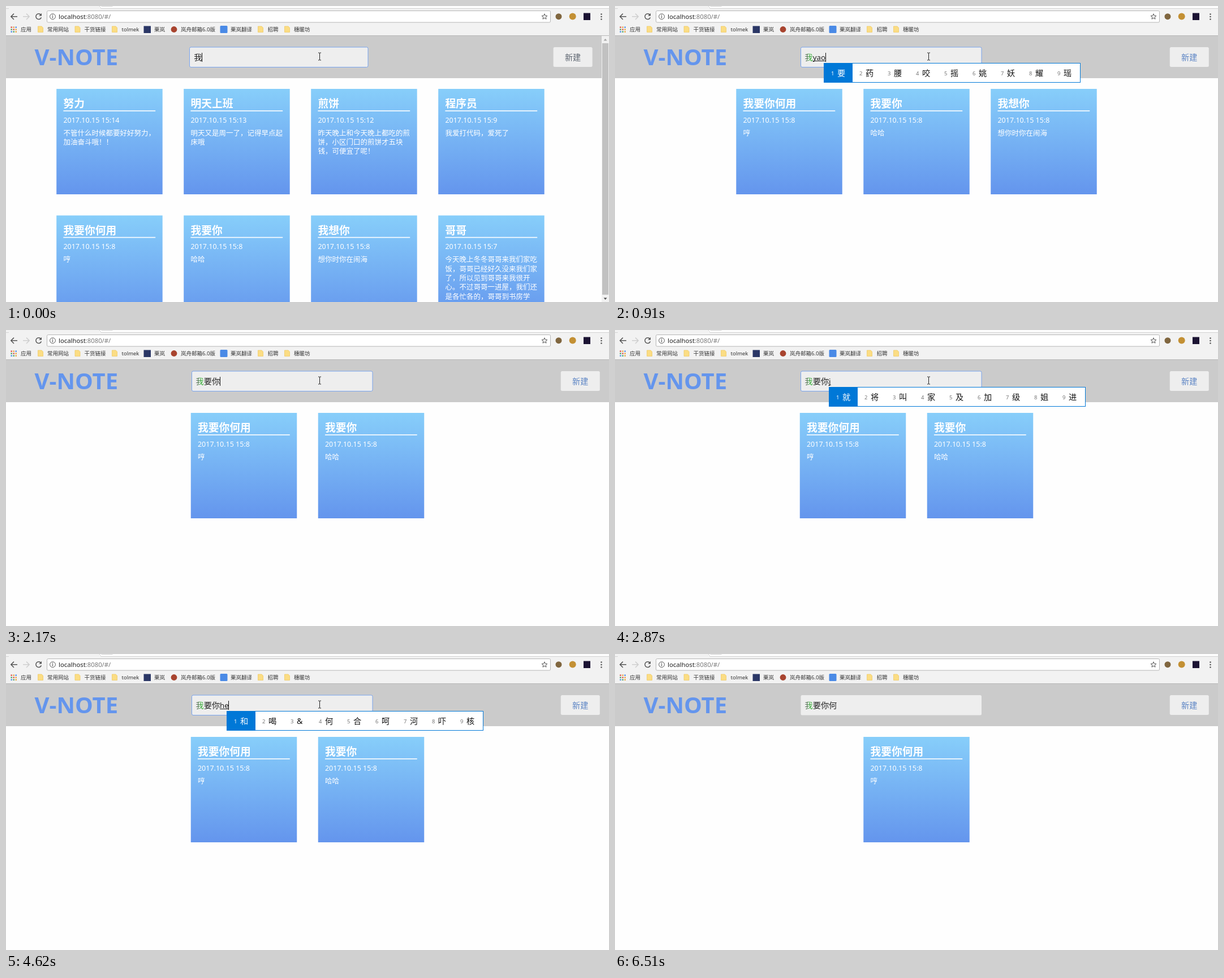
An HTML page for the animation above (6650 ms loop, 1066 by 525 pixels).

```html
<!DOCTYPE html>
<html lang="zh-CN">
<head>
<meta charset="utf-8">
<title>V-NOTE</title>
<style>
  html, body { margin: 0; width: 100%; height: 100%; overflow: hidden; background: #fefefe; }
  svg { display: block; font-family: "Noto Sans", "Noto Sans CJK SC", sans-serif; }
  text { white-space: pre; }
</style>
</head>
<body>
<svg id="stage" width="1066" height="525" viewBox="0 0 1066 525">
  <defs>
    <linearGradient id="sky" x2="0" y2="1">
      <stop stop-color="#87cefa"/><stop offset="1" stop-color="#6495ed"/>
    </linearGradient>
    <linearGradient id="tint">
      <stop offset=".2" stop-color="#5b6b5b"/><stop offset=".6" stop-color="#35ad35"/>
    </linearGradient>
  </defs>
  <g id="cards"></g>
  <g id="header">
    <rect y="53" width="1066" height="75" fill="#cbcbcb"/>
    <text x="50.5" y="105" font-size="40" font-weight="700" fill="#6495ed">V-NOTE</text>
    <rect id="field" y="73" height="35.5" rx="2.5" fill="#eee"/>
    <g id="button">
      <rect y="73" width="69" height="35" rx="2.5" fill="#eee"/>
      <text x="34.5" y="96.3" font-size="14.2" text-anchor="middle">新建</text>
    </g>
    <text id="first" y="96.3" font-size="14.2">我</text>
    <text id="rest" x="349.7" y="96.3" font-size="14.2" fill="#222"></text>
    <text id="comp" y="96" font-size="13.3" fill="#222"></text>
    <rect id="underline" y="97" height="1" fill="#222"/>
    <rect id="caret" y="83" width="1" height="16" fill="#111"/>
  </g>
  <g id="scrollbar">
    <rect x="1053" y="53" width="13" height="472" fill="#f1f1f1"/>
    <rect x="1054" y="66" width="11" height="446" fill="#c1c1c1"/>
    <path d="M1056.5 61.5l3-3.5 3 3.5z" fill="#a3a3a3"/>
    <path d="M1056.5 517.5l3 3.5 3-3.5z" fill="#505050"/>
  </g>
  <g id="ime"></g>
  <g id="chrome"></g>
  <path id="beam" d="M-2.5 -6.5h2l.5 .5 .5-.5h2M0 -6v12M-2.5 6.5h2l.5-.5 .5 .5h2" fill="none" stroke="#222"/>
  <path id="arrow" d="M0 0v15l3.6-3.4 2.4 5.4 2.2-1-2.4-5.2h4.8z" fill="#fff" stroke="#222" stroke-width=".9"/>
</svg>
<script>
const LOOP = 6650, TICK = 70;
const $ = id => document.getElementById(id);
const set = (el, attrs) => { for (const k in attrs) el.setAttribute(k, attrs[k]); };
const show = (el, on) => set(el, { visibility: on ? 'visible' : 'hidden' });
const text = (x, y, s, size, fill, more = '') =>
  `<text x="${x}" y="${y}" font-size="${size}" fill="${fill}" ${more}>${s}</text>`;
const rect = (x, y, w, h, fill, more = '') =>
  `<rect x="${x}" y="${y}" width="${w}" height="${h}" fill="${fill}" ${more}/>`;
const dot = (x, y, r, fill) => `<circle cx="${x}" cy="${y}" r="${r}" fill="${fill}"/>`;
const line = (d, stroke, w = 1.5) => `<path d="${d}" fill="none" stroke="${stroke}" stroke-width="${w}"/>`;

// Browser frame
function drawChrome() {
  const apps = ['#d9534a', '#e9a13b', '#4b8bea', '#4aa564', '#d9534a', '#e9a13b', '#4b8bea', '#4aa564', '#e9a13b'];
  const folder = x => `<path d="M${x} 36h6.5l2.5 2.5v8h-9z" fill="#fbdd84" stroke="#edc65c" stroke-width=".7"/>`;
  const marks = [[26, '应用'], [73, '常用网站'], [138.5, '干货链接'], [204.5, 'tolmek'], [262, '栗岚'],
    [309, '岚舟邮箱6.0版'], [397, '栗岚翻译'], [462.5, '招聘'], [509, '穗暖坊']];
  const star = Array.from({ length: 10 }, (_, i) => {
    const a = i * Math.PI / 5, r = i % 2 ? 2.3 : 5.2;
    return `${952 + r * Math.sin(a)},${19 - r * Math.cos(a)}`;
  }).join(' ');
  $('chrome').innerHTML =
    rect(0, 0, 1066, 53, '#f2f2f2') + rect(165, 0, 901, 4, '#fcfcfc') +
    line('M0 4.5h5M165 0l3 4.5h898', '#d2d2d2', 1) +
    rect(168, -3, 21, 4, '#d5d5d5', 'rx="1.5"') +
    rect(0, 52, 1066, 1, '#b9b9b9') +
    line('M20 18.8H9M14 13.6l-5.2 5.2 5.2 5.2', '#555') +
    line('M30 18.8h11M36 13.6l5.2 5.2-5.2 5.2', '#cfcfcf') +
    line('M61.6 15.6a4.9 4.9 0 1 0 .8 4.6', '#555') +
    '<path d="M63 12.8v4.8h-4.8z" fill="#555"/>' +
    rect(72.5, 8.5, 890, 20.5, '#fff', 'rx="2" stroke="#b5b5b5"') +
    '<circle cx="82.5" cy="18.7" r="4.9" fill="none" stroke="#555"/>' +
    line('M82.5 17.8v3.8M82.5 15.6v1.3', '#555', 1.2) +
    text(93, 22.7, 'localhost<tspan fill="#777">:8080/#/</tspan>', 11.3, '#222') +
    `<polygon points="${star}" fill="none" stroke="#555"/>` +
    dot(977, 18.7, 5.5, '#80663f') + dot(1001.7, 18.5, 6, '#c39034') +
    rect(1021, 12.5, 12, 12.5, '#1b1333') +
    [14.5, 19, 23.5].map(y => dot(1052.5, y, 1.3, '#555')).join('') +
    apps.map((c, i) => rect(8.5 + i % 3 * 4, 36.5 + (i / 3 | 0) * 4, 2.4, 2.4, c)).join('') +
    [56.5, 122, 187.5, 445.5, 492.5].map(folder).join('') +
    rect(243.5, 35.5, 12.5, 12.5, '#2b3766') + dot(297, 41.5, 5.4, '#a8442f') +
    rect(378.5, 35, 13, 13, '#4a8ae6', 'rx="1.5"') +
    marks.map(([x, s]) => text(x, 45.3, s, 9.5, '#333')).join('');
}

// Notes
const NOTES = [
  ['努力', '15:14', '不管什么时候都要好好努力，|加油奋斗哦！！'],
  ['明天上班', '15:13', '明天又是周一了，记得早点起|床哦'],
  ['煎饼', '15:12', '昨天晚上和今天晚上都吃的煎|饼，小区门口的煎饼才五块|钱，可便宜了呢！'],
  ['程序员', '15:9', '我爱打代码，爱死了'],
  ['我要你何用', '15:8', '哼'],
  ['我要你', '15:8', '哈哈'],
  ['我想你', '15:8', '想你时你在闹海'],
  ['哥哥', '15:7', '今天晚上冬冬哥哥来我们家吃|饭，哥哥已经好久没来我们家|了，所以见到哥哥来我很开|心。不过哥哥一进屋，我们还|是各忙各的，哥哥到书房学|习，我在客厅看书，大家都忙']
];
const STAGES = [[0, 1, 2, 3, 4, 5, 6, 7], [4, 5, 6], [4, 5], [4]];
// Moment each filter shows, and where its easing begins
const FILTERS = [[70, -88], [1330, 1265], [4970, 4910]];
const MOVE = 300, LEAVE_LAG = 0.135, EXIT = [458.25, 182.5];

function drawNotes() {
  $('cards').innerHTML = NOTES.map(([title, time, body]) => '<g>' +
    rect(0, 0, 187.5, 187, 'url(#sky)') +
    text(12.2, 33, title, 18.75, '#fff', 'font-weight="700"') +
    rect(12.2, 38.2, 162.8, 1.6, '#fff') +
    text(12.2, 59.6, '2017.10.15 ' + time, 12.5, '#fff') +
    body.split('|').map((s, i) => text(12.2, 82.8 + 16.3 * i, s, 12.5, '#fff')).join('') +
    '</g>').join('');
}

function slot(stage, note) {
  if (!stage) return [89.2 + 225 * (note % 4), 147 + 224.5 * (note >> 2)];
  const ids = STAGES[stage];
  return [551.75 - 112.5 * ids.length + 225 * ids.indexOf(note), 147];
}

// cubic-bezier(.25, .1, .25, 1)
function ease(u) {
  if (u <= 0) return 0;
  if (u >= 1) return 1;
  const curve = (a, b, s) => 3 * a * s * (1 - s) ** 2 + 3 * b * s * s * (1 - s) + s ** 3;
  let lo = 0, hi = 1;
  for (let i = 0; i < 24; i++) {
    const mid = (lo + hi) / 2;
    curve(.25, .25, mid) < u ? lo = mid : hi = mid;
  }
  return curve(.1, 1, lo);
}

function placeNotes(t) {
  const stage = FILTERS.filter(f => t >= f[0]).length;
  const u = stage ? (t - FILTERS[stage - 1][1]) / MOVE : 1;
  [...$('cards').children].forEach((card, i) => {
    const stays = STAGES[stage].includes(i);
    const before = stage && STAGES[stage - 1].includes(i);
    const left = 1 - ease(stays ? u : u - LEAVE_LAG);
    const alive = stays || before && left > 0;
    show(card, alive);
    if (!alive) return;
    const to = stays ? slot(stage, i) : EXIT;
    const from = before ? slot(stage - 1, i) : to;
    const [x, y] = to.map((v, k) => v + (from[k] - v) * left);
    set(card, { transform: `translate(${x} ${y})`, opacity: stays ? 1 : left });
  });
}

// Typing: time, committed text, composition, its width, caret visible
const TYPING = [
  [0, '我', '', 0, 1], [420, '我', '', 0, 0],
  [630, '我', 'y', 7, 1], [770, '我', 'ya', 14.3, 1], [910, '我', 'yao', 22.4, 1],
  [1330, '我要', '', 0, 1], [1680, '我要', 'n', 8.3, 1], [1820, '我要', 'ni', 11.6, 1],
  [2170, '我要你', '', 0, 1], [2380, '我要你', 'j', 3.6, 1], [2870, '我要你', 'j', 3.6, 0],
  [3010, '我要你', '', 0, 1], [3500, '我要你', 'h', 8.2, 1], [3640, '我要你', 'he', 15.6, 1],
  [4130, '我要你', 'he', 15.6, 0], [4620, '我要你', 'he', 15.6, 1],
  [4970, '我要你何', '', 0, 1], [5460, '我要你何', '', 0, 0],
  [5950, '我要你何', '', 0, 1], [6370, '我要你何', '', 0, 0]
];
const CANDIDATES = {
  y: '有一要也以用又于与', ya: '呀压牙亚鸭雅哑芽崖', yao: '要药腰咬摇姚妖耀瑶',
  n: '你那能年呢女内拿难', ni: '你呢尼泥拟逆腻妮匿',
  j: '就将叫家及加级姐进', h: '和会好后还很或话回', he: '和喝&何合呵河吓核'
};
const BLUR = 6510;

function drawIme(comp, caretX) {
  const ime = $('ime');
  if (ime.dataset.key === comp) return;
  ime.dataset.key = comp;
  if (!comp) { ime.innerHTML = ''; return; }
  const x = caretX - 2.5;
  ime.innerHTML = rect(x, 101.5, 453, 34, '#fff', 'stroke="#0078d7"') + rect(x, 101.5, 50.5, 34, '#0078d7') +
    [...CANDIDATES[comp]].map((c, i) =>
      text(x + 12.5 + 50 * i, 123, i + 1, 9.5, i ? '#777' : '#fff') +
      text(x + 23.5 + 50 * i, 124.2, c.replace('&', '&amp;'), 14.2, i ? '#111' : '#fff')).join('');
}

function placeHeader(t) {
  const wide = t >= FILTERS[0][0], focus = t < BLUR;
  const [, done, comp, width, caret] = TYPING.filter(r => r[0] <= t).pop();
  const textX = wide ? 335.5 : 332.3;
  const compX = textX + 14.2 * done.length;
  const caretX = Math.floor(compX + width);
  show($('scrollbar'), !wide);
  set($('field'), { x: wide ? 328.5 : 324.5, width: wide ? 319.5 : 315.5, stroke: focus ? '#79a4ee' : 'none' });
  set($('button'), { transform: `translate(${wide ? 980.8 : 967.6} 0)`, fill: wide ? '#5a83c4' : '#5d6570' });
  set($('first'), { x: textX, fill: wide ? 'url(#tint)' : '#222' });
  $('rest').textContent = done.slice(1);
  $('comp').textContent = comp;
  set($('comp'), { x: compX });
  set($('underline'), { x: compX, width });
  set($('caret'), { x: caretX, fill: wide && done.length < 2 && !comp ? '#35ad35' : '#111' });
  show($('caret'), caret && focus);
  drawIme(comp, caretX);
}

// Pointer leaves through the bottom of the page
const EXIT_START = 5460;
const PATH = [[557, 81], [598, 77], [690, 112], [780, 192], [850, 290], [905, 390], [934, 482]];

function placePointer(t) {
  const step = Math.floor((t - EXIT_START) / TICK);
  const at = step < 0 ? [554.5, 89.5] : PATH[step];
  const inField = step < 2;
  show($('beam'), at && inField);
  show($('arrow'), at && !inField);
  if (at) set($(inField ? 'beam' : 'arrow'), { transform: `translate(${at})` });
}

function render(ms) {
  const t = Math.floor(ms % LOOP / TICK) * TICK;
  placeNotes(t);
  placeHeader(t);
  placePointer(t);
}

drawChrome();
drawNotes();
const start = performance.now();
const loop = () => {
  render(performance.now() - start);
  requestAnimationFrame(loop);
};
loop();
</script>
</body>
</html>
```
